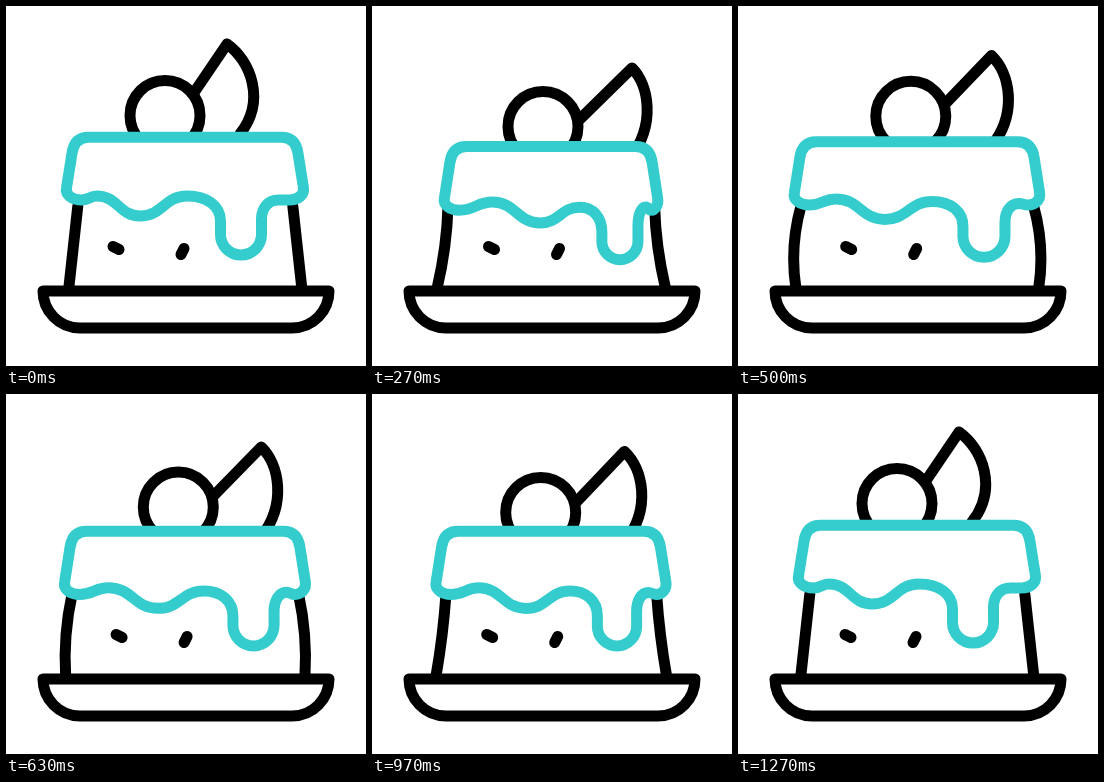
An HTML page that plays this animation: 360x360 px, repeating every 1670 ms.

```html
<!DOCTYPE html>
<html lang="en">
<head>
<meta charset="utf-8">
<title>Wobbling pudding</title>
<style>
html, body { margin: 0; width: 100%; height: 100%; overflow: hidden; background: #fff; }
svg { display: block; width: 100%; height: 100%; }
path, circle { fill: #fff; stroke: #000; stroke-width: 11; stroke-linecap: round; stroke-linejoin: round; }
#sides, #seeds { fill: none; }
#icing { stroke: #34cccc; }
</style>
</head>
<body>
<svg viewBox="0 0 360 360">
  <path id="sides"/>
  <path id="seeds"/>
  <path id="leaf"/>
  <circle id="cherry" r="35"/>
  <path id="icing"/>
  <path d="M37 285H323C323 305 307 322 286 322H74C53 322 37 305 37 285Z"/>
</svg>
<script>
const LOOP = 1670, LAST = 38, MID = 179.3;
const el = id => document.getElementById(id);
const draw = (id, d) => el(id).setAttribute("d", d);
const ease = u => u * u * (3 - 2 * u);

// From rest to a squash, a rebound, a second squash and back to rest.
function wobble(tick, squash, rebound, again, end = LAST) {
  const times = [0, 8, 15.5, 25.5, end], values = [0, squash, rebound, again, 0];
  const i = times.findIndex(t => t > tick);
  if (i < 0) return 0;
  const u = (tick - times[i - 1]) / (times[i] - times[i - 1]);
  return values[i - 1] + (values[i] - values[i - 1]) * ease(u);
}

// Curve between two points that are both level, like a crest and a trough.
function swell([x0, y0], [x1, y1]) {
  const h = (x1 - x0) * 0.48;
  return `C${x0 + h} ${y0} ${x1 - h} ${y1} ${x1} ${y1}`;
}

function icingPath(sink, girth) {
  // slide and drop say how strongly a point follows the sinking icing
  const put = (x, y, slide, drop) =>
    [MID + (x - MID) * (1 + girth) + 27 * slide * sink, y + 9.3 * drop * sink];
  const top = 131.3 + 9.3 * sink;
  const [lx, ly] = put(60.5, 182, 0, 1.1), [rx, ry] = put(297.5, 182, 0, 1.1);
  const crest = put(91, 190, 0.77, 0.65), trough = put(134, 210, 1.1, 0.75);
  const hump = put(181, 190, 1, 1.2);
  const [dl, bottom] = put(214.5, 249, 0.7, 0.5), [dr, ny] = put(255.5, 194, 0.67, 0.75);
  const r = (dr - dl) / 2, gap = rx - dr;
  const left = [lx + 15, ly + 12], right = [rx - 0.33 * gap, ry + 12];
  const notch = [dr + 0.4 * gap, ny];
  return `M${lx + 5.5} ${top + 16}C${lx + 7} ${top + 6} ${lx + 12} ${top} ${lx + 22} ${top}`
    + `H${rx - 22}C${rx - 12} ${top} ${rx - 7} ${top + 6} ${rx - 5.5} ${top + 16}`
    + `L${rx} ${ry}C${rx + 1} ${ry + 7} ${rx - 0.14 * gap} ${right[1]} ${right}`
    + swell(right, notch)
    + `C${dr + 0.16 * gap} ${ny} ${dr} ${ny + 8} ${dr} ${ny + 19}`
    + `V${bottom - r}A${r} ${r} 0 0 1 ${dl} ${bottom - r}V${hump[1] + 25}`
    + `C${dl} ${hump[1] + 10} ${hump[0] + (dl - hump[0]) * 0.6} ${hump[1]} ${hump}`
    + swell(hump, trough) + swell(trough, crest) + swell(crest, left)
    + `C${lx + 6} ${left[1]} ${lx - 1.5} ${ly + 7} ${lx} ${ly}Z`;
}

function leafPath(tilt, settle) {
  const fall = 13 * tilt + 11 * settle;
  const at = (x, y, lean) => `${x + lean * tilt} ${y + fall}`;
  return `M${at(183, 94, 20)}L${at(221, 38, 39)}`
    + `C${at(245, 55, 32)} ${at(260, 95, 24)} ${at(234, 128, 24)}`;
}

function sidesPath(bulge) {
  const side = dir => {
    const x = (half, give) => MID + dir * (half + give * bulge);
    return `M${x(107.5, 9)} 200Q${x(112, 16)} 241 ${x(116.5, 5)} 282`;
  };
  return side(-1) + side(1);
}

function render(ms) {
  const tick = Math.min(LAST, Math.floor((ms % LOOP + 5) * 0.03));
  const sink = wobble(tick, 1, 0.48, 1, 34);
  const settle = wobble(tick, 1, 0.06, 1);
  const tilt = wobble(tick, 1, 0.83, 1);
  const girth = wobble(tick, -0.1, 0.037, -0.037);
  const bulge = wobble(tick, -0.47, 1, -0.3);
  const shift = 9.5 * settle;
  draw("sides", sidesPath(bulge));
  draw("seeds", `M${107 + shift} 240.5l6 3M${178 + shift} 242.5l-3 6`);
  draw("leaf", leafPath(tilt, settle));
  el("cherry").setAttribute("cx", 159 + 17 * tilt - 5 * settle);
  el("cherry").setAttribute("cy", 109.5 + 11 * settle);
  draw("icing", icingPath(sink, girth));
}

const start = performance.now();
function loop() {
  render(performance.now() - start);
  requestAnimationFrame(loop);
}
loop();
</script>
</body>
</html>
```
